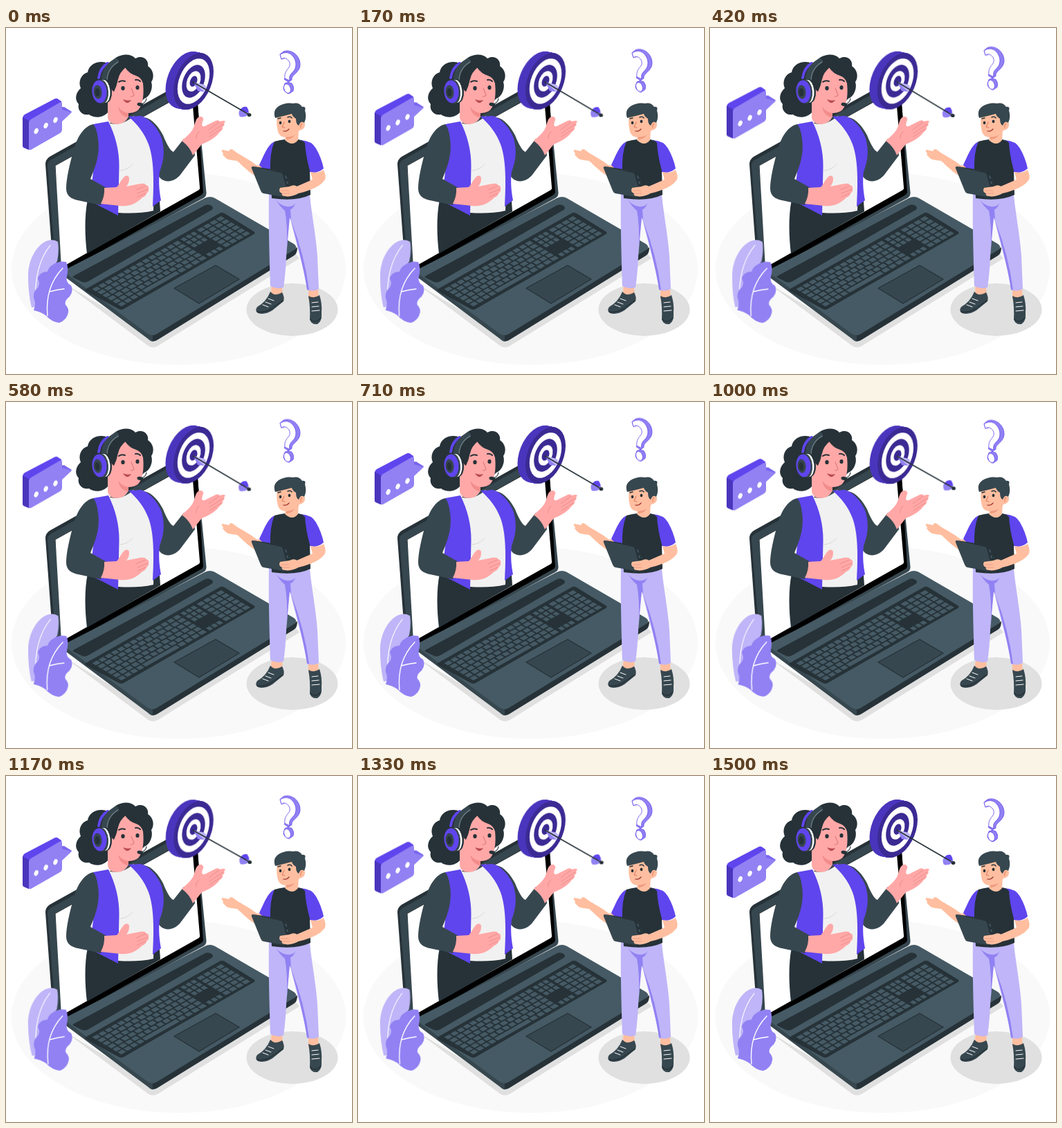
These frames come from a looping animation (500x500 px, 1540 ms). An HTML page:

```html
<!DOCTYPE html>
<html lang="en">
<head>
<meta charset="utf-8">
<title>Online mentor</title>
<style>
html, body { margin: 0; width: 100%; height: 100%; overflow: hidden; background: #fff; }
svg { display: block; width: 100vw; height: 100vh; }
.ink { fill: #263238; } .slate { fill: #37474f; } .steel { fill: #455a64; }
.vio { fill: #5f45ed; } .lil { fill: #9181f3; } .pale { fill: #bfb5f8; }
.deep { fill: #3b2a93; } .rim { fill: #4a35bd; }
.skin { fill: #ffa8a7; } .peach { fill: #ffbe9f; } .white { fill: #fff; } .grey { fill: #e0e0e0; }
.line { fill: none; stroke-linecap: round; stroke-linejoin: round; }
.sway { transform-box: fill-box; transform-origin: center; }
</style>
</head>
<body>
<svg viewBox="0 0 500 500">
  <ellipse cx="249.500" cy="348" rx="241.500" ry="139" fill="#f9f9f9"/>
  <path class="grey" d="M86 370L205 459Q212 464 220 459L424 333L410 316L212 446Z"/>
  <ellipse class="grey" cx="413.500" cy="407" rx="66" ry="38"/>

  <g id="screen">
    <path class="ink" d="M57 197Q57 190 63 186L262 75Q271 71 272 85L284 238L88 351L68 345Z"/>
    <path class="slate" d="M60 198Q60 193 66 190L266 78Q274 76 275 90L289.500 238Q290 243 285 246L84 354L72 347Z"/>
    <path d="M71 199L270 88L276 90L285 238L283 241L85 352Z"/>
    <path class="white" d="M71.500 199L264 92Q268 91 268.500 96L280 230Q281 233 277 235L80 346Z"/>
  </g>

  <g id="woman">
    <path class="ink" d="M118 248C113 272 114 302 117 326L223 265L222 250Z"/>
    <path class="slate" d="M200 129C211 131 220 142 227 155C232 168 238 178 242 179L257 160C264 165 273 176 273 184L252 212C244 222 232 224 224 218C212 206 210 180 205 160Z"/>
    <path fill="#f1f1f1" d="M146 136C156 142 174 138 184 127C204 144 215 166 215 192L213 264C196 268 178 268 162 267L155 180Z"/>
    <path class="line" stroke="#d9d9d9" stroke-width="1" d="M164 206Q175 206 183 197"/>
    <path class="vio" d="M177 128L195 127C208 131 219 144 225 159C230 178 228 192 222 208C220 224 222 238 224 249L212 258C214 222 214 190 206 168C200 152 190 139 177 128Z"/>
    <path class="vio" d="M126 139L148 135C158 155 164 178 163.500 200L162 271L121 250L127 200Z"/>
    <path class="slate" d="M126 139C113 142 104 156 99 172C92 196 87 218 87 232C87 243 95 247 104 249L137 256Q144 243 145 231L122 218C131 197 136 180 133 160Q131 144 126 139Z"/>
    <path class="skin" d="M142 231L160 230C165 225 166 219 172 214Q178 212 178 218Q178 224 174 229L194 225Q202 224 202 227Q207 228 206 232Q207 236 203 239Q202 243 197 245C187 255 177 258 165 257L137 254Q143 243 142 231Z"/>
    <path class="line" stroke="#e58886" stroke-width=".8" d="M188 234L202 228M190 239L205 233M190 244L202 239"/>
    <path class="skin" d="M254 163C264 154 270 149 272 141C274 134 276 127 282 128Q286 129 285 133C282 140 283 143 287 142L303 134Q308 132 308 135L314 134Q319 134 315 138Q317 140 313 143Q314 147 309 150C302 160 292 164 283 168L270 184Q266 172 254 163Z"/>
    <path class="line" stroke="#e58886" stroke-width=".8" d="M293 147L308 136M294 152L314 139M294 157L311 146M279 150Q274 154 275 160"/>

    <path class="ink" d="M150 52C158 38 178 34 187 44C197 38 207 46 205 55C213 60 215 71 210 78C213 87 208 99 200 102C194 108 184 112 170 112L148 121C141 130 128 131 120 125C109 127 103 118 105 110C99 104 100 94 108 87C104 78 108 67 118 64C120 51 136 45 150 52Z"/>
    <path class="skin" d="M151 80C153 66 161 58 172 57Q178 66 188 69Q196 72 198 80C200 99 197 115 189 120Q184 123 177 123L177 128Q172 139 160 139Q149 139 147 130L147 106Z"/>
    <path fill="#f28d8c" d="M177 123Q167 121 162 114Q165 128 177 129Z"/>
    <path class="ink" d="M150 82C150 64 160 56 174 56Q164 64 162 74Q160 84 156 92Q152 90 150 82Z"/>
    <ellipse class="ink" cx="169" cy="87" rx="2.700" ry="3.100"/><ellipse class="ink" cx="190" cy="86" rx="2.600" ry="3.100"/>
    <path class="line" stroke="#263238" stroke-width="2" d="M163 78Q167 75 172 77M187 75Q191 74 194 77"/>
    <path class="line" stroke="#e07f80" stroke-width="1.200" d="M181 87L185 97Q184 99 180 99"/>
    <path fill="#b94b55" d="M169 103Q175 106 181 104Q178 109 174 108Q171 107 169 103Z"/>

    <path class="line" stroke="#5f45ed" stroke-width="4" d="M134 72Q136 57 147 51"/>
    <path class="line" stroke="#37474f" stroke-width="8" d="M142 78Q141 57 159 48"/>
    <path class="line" stroke="#75848b" stroke-width="1.200" d="M146 75Q147 58 162 49"/>
    <ellipse class="ink" cx="144" cy="91" rx="9" ry="17" transform="rotate(-5 144 91)"/>
    <ellipse class="white" cx="142" cy="91.500" rx="8.500" ry="16.500" transform="rotate(-5 142 91)"/>
    <ellipse class="slate" cx="139" cy="92" rx="9" ry="17" transform="rotate(-5 139 92)"/>
    <ellipse class="vio" cx="135" cy="92" rx="10.500" ry="16.500" transform="rotate(-5 135 92)"/>
    <ellipse class="slate" cx="132.500" cy="92.500" rx="6" ry="10" transform="rotate(-5 132 92)"/>
    <ellipse class="ink" cx="132" cy="93" rx="3.500" ry="6" transform="rotate(-5 132 93)"/>
    <path class="line" stroke="#263238" stroke-width="1.200" d="M196 110Q202 108 203 102"/>
    <ellipse class="ink" cx="194" cy="110.500" rx="4.500" ry="2.600" transform="rotate(12 194 110)"/>
  </g>

  <g id="base">
    <path class="slate" d="M84 350L84 356Q84 359 87 361L205 449Q209 453 212 453L214 440Z"/>
    <path class="ink" d="M212 440L212 453Q216 453 220 450L416 329Q421 326 421 317Z"/>
    <path class="steel" d="M86 349L287 246Q295 242 302 246L416 312Q423 317 416 321L218 442Q212 446 205 442L87 355Q82 352 86 349Z"/>
    <path class="ink" d="M98 358L288 256Q293 254 297 257Q301 260 297 263L119 366Q113 369 108 366L98 361Q95 360 98 358Z"/>
    <path class="ink" d="M114 378L310 267Q313 266 316 268L358 294Q361 296 358 298L170 406Q166 408 163 406L115 380Z"/>
    <g id="keys" class="steel" transform="matrix(196 -111 49 29 116 378)"></g>
    <path class="slate" stroke="#263238" stroke-width="1.200" d="M243 376L303 343L337 363L279 398Z"/>
  </g>

  <g id="target" class="sway">
    <g id="disc"></g>
    <path class="pale" d="M271 78L287 82L290 86L286 92L277 89Z"/>
    <path class="lil" d="M271 78L286 92L277 91Z"/>
    <path class="vio" d="M338 119Q341 113 348 114Q351 118 351 123L344 121Z"/>
    <path class="lil" d="M338 118L350 125Q345 130 338 128Q335 123 338 118Z"/>
    <path class="line" stroke="#263238" stroke-width="1.600" d="M270 78L351 125"/>
    <ellipse class="ink" cx="351.500" cy="125.500" rx="2.900" ry="2.600"/>
  </g>

  <g id="man">
    <path class="peach" d="M384 371L399 373L400 388L382 389Z M437 376L451 376L452 392L437 392Z"/>
    <path class="slate" d="M382 381Q389 389 399 382Q403 389 401 395L385 408Q374 415 364 412Q359 409 363 403Q376 396 382 381Z"/>
    <path class="slate" d="M437 387Q445 392 453 386Q457 398 456 411Q457 424 450 428Q441 429 439 421Q440 404 437 387Z"/>
    <path class="line" stroke="#fff" stroke-width="1" d="M379 391L387 394M375 396L383 399M371 400L379 403M442 397L451 396M442 403L452 402M442 409L453 408"/>
    <path class="line" stroke="#263238" stroke-width="1.500" d="M363 410Q373 412 383 406L400 394M440 421Q447 428 455 419"/>
    <path class="pale" d="M380 240L439 241C441 265 448 300 450 330L452 377Q444 382 435 378C431 345 418 308 410 272L405 330Q404 355 401 375Q391 378 382 373C381 340 379 280 380 240Z"/>
    <path class="lil" d="M389 246Q394 256 406 258L410 273L406 316Q407 285 403 264Q394 256 389 246ZM406 258Q415 259 419 253Q414 262 411 262L412 278L410 274ZM435 378Q430 344 412 278Q432 330 438 379Z"/>
    <path class="peach" d="M371 194C366 202 362 199 355 193L340 184Q334 181 328 176Q324 173 322 178L313 176Q310 177 314 181Q312 183 316 186Q318 190 326 191L334 192C345 202 357 214 365 215Q373 214 381 204Z"/>
    <path class="vio" d="M390 164C380 165 374 181 366 198Q372 206 385 207L392 180Z"/>
    <path class="vio" d="M426 162Q442 163 448 174Q456 188 459 203Q450 211 439 208L428 186Z"/>
    <path class="ink" d="M388 164Q395 162 403 161L422 161Q429 162 432 166Q433 184 439 206L440 241Q420 251 384 246L382 207Q381 180 388 164Z"/>
    <path class="peach" d="M405 148L423 146L422 162Q414 172 403 162Z"/>
    <path fill="#ee9b80" d="M405 157Q414 156 420 148Q416 161 405 161Z"/>
    <path class="peach" d="M392 127Q402 118 416 123L424 136Q429 133 432 138Q433 146 424 148Q419 157 404 158Q395 157 393 150Q390 139 392 127Z"/>
    <path class="slate" d="M389 130Q385 119 394 113Q404 107 415 109Q423 107 428 114Q434 113 432 119Q435 129 431 137Q426 133 423 141Q419 139 419 131Q414 128 413 124Q402 127 389 130Z"/>
    <ellipse class="ink" cx="396.500" cy="137" rx="1.800" ry="2.200"/><ellipse class="ink" cx="409.500" cy="135" rx="1.900" ry="2.300"/>
    <path class="line" stroke="#263238" stroke-width="1.500" d="M393 131L397 130M407 129Q411 127 413 130"/>
    <path class="line" stroke="#df8068" stroke-width="1.100" d="M402 136L399 143L403 144M428 138Q425 140 426 144"/>
    <path class="line" stroke="#a8443e" stroke-width="1.300" d="M401 149Q406 150 409 146"/>
    <path class="peach" d="M440 208Q450 211 459 205Q463 214 461 219C455 229 437 236 422 239Q409 246 400 242L394 237Q393 232 402 229L420 229L443 219Z"/>
    <path class="slate" d="M357 200L401 207Q404 207 405 210L412 231Q413 235 409 236L406 243Q404 245 400 244L372 239Q369 238 368 235L355 203Q354 200 357 200Z"/>
    <path class="ink" d="M357 200L401 207Q404 207 405 210L414 240L408 242L400 212Q399 209 396 209Z"/>
    <path class="steel" d="M403 213l2 1l1 4l-2 -1ZM405 221l2 1l1 4l-2 -1Z"/>
    <path class="peach" d="M396 231L410 229Q417 225 422 230L424 238Q416 244 403 243Q397 242 399 239Q393 237 396 231Z"/>
    <path class="line" stroke="#e8957b" stroke-width=".8" d="M397 235L409 235M400 239L410 239"/>
  </g>

  <g id="plant" class="sway">
    <path class="pale" d="M75 309Q68 304 58 308C43 315 32 336 32 358Q32 384 37 404L58 400Q56 360 74 337Q77 322 75 309Z"/>
    <path class="line" stroke="#fff" stroke-width="1.200" d="M64 314Q40 344 43 396"/>
    <path class="lil" d="M87 338Q76 336 68 342Q62 345 60 352Q49 352 46 362Q50 369 46 375Q39 381 40 390Q44 398 40 408Q50 410 57 415Q66 425 77 426Q88 422 90 411Q91 405 86 400Q84 394 92 388Q98 380 94 372Q86 368 88 359Q91 346 87 338Z"/>
    <path class="line" stroke="#fff" stroke-width="1.400" d="M82 347Q56 374 60 416M63 381Q74 378 84 377"/>
  </g>

  <g id="bubble">
    <path class="vio" d="M24 130Q24 127 27 125L70 102.500Q73 101 75 102.500L80 106L81 114L95 121L76 130L33 176L26 173Q24 172 24 169Z"/>
    <path class="rim" d="M24 129L33 134L33 176L26 173Q24 172 24 169Z"/>
    <path fill="#7765ef" d="M80 115L84 114L95 121L81 126Z"/>
    <path class="lil" d="M33 137Q33 134 36 132L77 108Q81 106 81 110L81 118L95 122L81 135L81 147Q81 150 78 152L36 176Q33 177 33 174Z"/>
  </g>
  <g id="dots" class="white"></g>

  <g id="question" stroke="#5f45ed" stroke-width=".8" stroke-linejoin="round">
    <path class="lil" d="M396 38L401 34Q408 31 416 36C425 42 427 54 423 60C418 68 412 69 413 75L408 78L402 74L410 62L418 54Q410 39 398 45Z"/>
    <path class="white" d="M396 38Q407 32 414 40C421 48 420 58 415 63C410 68 409 70 410 76L403 73C402 65 405 62 408 58Q412 54 409 48Q404 41 398 45Z"/>
    <path class="lil" d="M403 80Q408 77 413 80Q417 85 415 91L409 95Q402 93 401 87Z"/>
    <ellipse class="white" cx="406.500" cy="87.500" rx="4.700" ry="7" transform="rotate(-20 406.500 87.500)"/>
  </g>
</svg>
<script>
const $ = id => document.getElementById(id);

function add(parent, tag, attrs) {
  const el = document.createElementNS('http://www.w3.org/2000/svg', tag);
  for (const k in attrs) el.setAttribute(k, attrs[k]);
  parent.append(el);
}

const oval = (parent, x, y, rx, ry, turn, cls) =>
  add(parent, 'ellipse', { class: cls, rx, ry, transform: `translate(${x} ${y}) rotate(${turn})` });

// One row of n keys spread from x0 to x1 on the unit keyboard.
function keyRow(row, x0, x1, n) {
  const w = (x1 - x0) / n;
  for (let i = 0; i < n; i++) {
    add($('keys'), 'rect', {
      x: x0 + i * w + .005, y: .055 + row * .15 + .018,
      width: w - .01, height: .114, rx: .005
    });
  }
}
for (let row = 0; row < 6; row++) {
  if (row < 5) keyRow(row, .02, .66, row % 2 ? 13 : 14);
  if (row < 3) keyRow(row, .67, .78, 3);
  keyRow(row, .79, .98, 4);
}
keyRow(5, .02, .2, 4);
keyRow(5, .2, .46, 1);
keyRow(5, .46, .66, 4);
keyRow(5, .67, .78, 3);

// Thick disc: its rim is swept from back to front, then the rings.
for (let i = 0; i <= 10; i++) oval($('disc'), 259.5 + i, 75 + i * .2, 26, 43, 22, 'rim');
[[1, 'deep'], [.8, 'white'], [.58, 'deep'], [.36, 'white'], [.19, 'deep']].forEach(([s, c]) =>
  oval($('disc'), 271, 77, 26 * s, 43 * s, 22, c));

for (let i = 0; i < 3; i++) oval($('dots'), 43.7 + i * 13.9, 149 - i * 8, 2.9, 4.3, 22, 'white');

// Each 1500 ms cycle is followed by a short rest.
const LOOP = 1540, CYCLE = 1500;
function play(id, steps) {
  const frames = steps.map(([at, transform]) => ({ offset: at * CYCLE / LOOP, transform }));
  frames.push({ offset: 1, transform: steps[0][1] });
  $(id).animate(frames, { duration: LOOP, iterations: Infinity }).startTime = 0;
}
const float = h => [[0, 'translateY(0px)'], [.5, `translateY(${-h}px)`], [1, 'translateY(0px)']];
const sway = [[0, 'rotate(0deg)'], [.25, 'rotate(1deg)'], [.75, 'rotate(-1deg)'], [1, 'rotate(0deg)']];

play('bubble', float(29.5));
play('dots', float(20));
play('question', float(10));
play('plant', sway);
play('target', sway);
</script>
</body>
</html>
```
